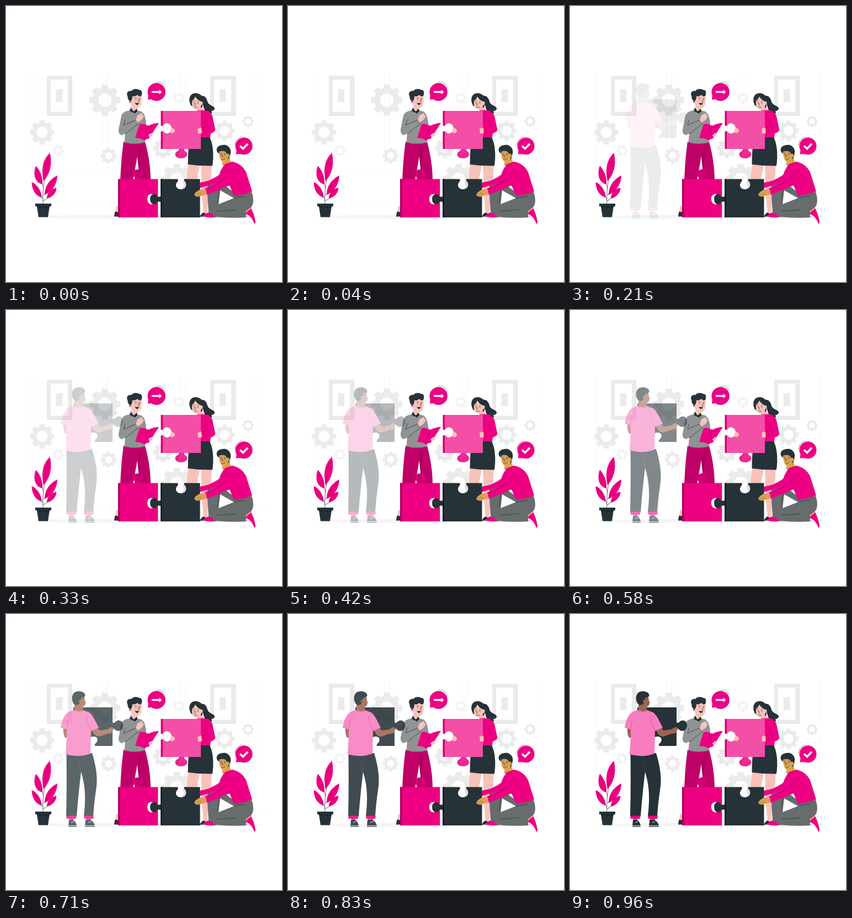
Recreate the animation shown at these times as an HTML page. Size 500 px wide and 500 px high, loop 1 s.

```html
<!DOCTYPE html>
<html lang="en">
<head>
<meta charset="utf-8">
<title>Teamwork puzzle</title>
<style>
html, body { margin: 0; width: 100%; height: 100%; overflow: hidden; background: #fff; }
svg { display: block; width: 100%; height: 100%; }
.ink { fill: #263238; }
.pink { fill: #ed0082; }
.deep { fill: #bf0069; }
.light { fill: #f34fa7; }
.gray { fill: #8f9394; }
.slate { fill: #676c6d; }
.fair { fill: #f7c2b9; }
.tan { fill: #dba050; }
.brown { fill: #9f6350; }
.white { fill: #fff; }
.line { fill: none; stroke: #263238; stroke-width: .7; stroke-linecap: round; stroke-linejoin: round; }
.fold { fill: none; stroke: #a9005c; stroke-width: .7; stroke-linecap: round; }
.mark { fill: none; stroke: #fff; stroke-width: 3.5; }
</style>
</head>
<body>
<svg viewBox="0 0 500 500">
  <defs>
    <g id="frame">
      <path fill="#ebebeb" d="M0 0H46V72H0Z"/>
      <path fill="#e2e2e2" d="M44.500 0H46V72H0V70.500H44.500Z"/>
      <path class="white" d="M7 7H38V65H7Z"/>
      <path fill="#ebebeb" d="M16.500 24.500H28.500V47.500H16.500Z"/>
    </g>
  </defs>

  <g fill="none" stroke="#f5f5f5" stroke-width=".8">
    <path d="M47 120V298H175V120M184.500 120V298H315V120M325 120V298H453V120"/>
    <path d="M32 350.500H66M85 354.500H200M440 358.500H472"/>
  </g>
  <use href="#frame" x="74" y="126.500"/>
  <use href="#frame" x="370" y="126.500"/>
  <g id="gears" fill-rule="evenodd"></g>
  <ellipse cx="258" cy="382" rx="208" ry="4" fill="#f5f5f5"/>

  <g id="plant">
    <path class="line" d="M67 358C66 340 68 328 70 312M67 353Q72 352 77 346M67 350Q61 345 58 338M68 342Q76 337 81 329M68 330Q66 321 61 313"/>
    <path class="pink" d="M68 317C64 299 65 280 79.500 266C84 284 81 304 68 317ZM66 323C53 321 48 305 54 289.500C62 298 67 310 66 323ZM70 342C70 326 79 314 93 307C93 321 84 337 70 342ZM65 347C53 344 47 333 46.500 319C57 323 64 335 65 347ZM74 349C74 339 81 331.500 91.500 329C91 340 84 346 74 349Z"/>
    <path class="fold" d="M68 317Q74 297 78 276M66 322Q62 307 56 297M70 341Q80 325 89 313M65 347Q58 333 50 324M74 348Q82 340 88 333"/>
    <path class="ink" d="M53 358H82V363H53ZM56 363H79L76 382.500H59Z"/>
    <path fill="#1a2328" d="M56 363H79L78.700 365H56.300Z"/>
  </g>

  <g id="reader">
    <path class="fair" d="M199 362H204V374H199Z"/>
    <path class="ink" d="M198 372L204 374V381.500H196Q196 376 198 372Z"/>
    <path class="deep" d="M213 246H252C258 268 262 292 262 316H242L238 272L230 316H207C208 292 210 266 213 246Z"/>
    <path fill="#a3005a" d="M238 272Q240 262 247 255Q242 266 243 280L242 306Z"/>
    <path class="fair" d="M227 180H238V192L232 195L226 190Z"/>
    <path class="fair" d="M226 162Q236 156 245 162C247 173 245 184 238 185C231 185.500 226 180 225.500 175Q221 175 222 169Z"/>
    <path class="ink" d="M226 173C221 170 220 167 220.500 164C217 158 221 153 227 154C231 149 238 150 241 152C246 151 248 157 245 163Q241 165 238 161Q233 165 229 163Q229 169 226 173Z"/>
    <circle class="pink" cx="224.500" cy="174" r="1.300"/>
    <path class="line" d="M233 167L236 166M241 167L243 167.500M239.500 169L241 173L239 173.500"/>
    <circle class="ink" cx="235.500" cy="169.500" r=".8"/><circle class="ink" cx="242" cy="169.500" r=".8"/>
    <path class="ink" d="M233 175Q238 177 241 175Q240 180 236 179Z"/>
    <path class="gray" d="M225 189C218 190 211 192 209 199L204 224Q203 232 210 234L216 231L214.500 247Q233 252 252 247L254 212Q252 194 245 191L237 189L231 195Z"/>
    <path class="ink" d="M226 184L231 191L237 186L238 191L233 195L224 190Z"/>
    <path class="line" d="M216 206L213 216L236 206M216 232L240 213"/>
    <path class="fair" d="M235 206L238 198L246 194Q249 194 246 197L250 199L246 206L239 211Z"/>
    <path class="pink" d="M242 214Q250 212 258 217Q268 212 277 212L259 240Q253 242 250 243Q242 239 234 239Z"/>
    <path class="fold" d="M258 217L250 243"/>
    <path class="fair" d="M258 234L263 230Q267 231 265 235L260 238Z"/>
  </g>

  <g id="holder">
    <path class="fair" d="M330 284H352L345 318H327ZM353 284H373C372 305 371 328 367 348L364 376H358L355 345Z"/>
    <path class="ink" d="M357 374L364 377L361 381L351 382Q353 377 357 374Z"/>
    <path class="ink" d="M352 163C358 161 363 165 365 173C368 182 379 180 378 187Q376 190 372 190Q375 195 369 196Q360 194 358 183Z"/>
    <path class="fair" d="M346 183H356L359 194H348Z"/>
    <path class="ink" d="M335 180C329 169 333 158 343 158C353 158 360 166 357 177L355 184L338 182Z"/>
    <path class="fair" d="M337 172Q341 169 343 164Q347 171 354 173Q357 173 356.500 177Q355 180 353.500 180Q352 188 346 188C339 187 336 181 337 172Z"/>
    <path class="line" d="M339 173L342 172M346 173L349 174M343 176L341.500 179.500H343M341 183.500Q344 182 347 183.500"/>
    <circle class="ink" cx="341" cy="176" r=".8"/><circle class="ink" cx="347.500" cy="176.500" r=".8"/>
    <path class="pink" d="M347 189H359C368 189 374 195 375 204L379 224Q379 228 371 231L370 239H335L348 216Z"/>
    <path class="ink" d="M334 238H369C375 249 377 269 374 289.500Q351 290 329.500 287C330 269 330 252 334 238Z"/>
    <path class="light" d="M281 190H353V259H281V228Q283 225 287 229C292 234 300 229 300 222C300 214 292 210 287 214Q283 219 281 216Z"/>
    <path fill="#d7006f" d="M280.500 190H284V217Q282 218 280.500 216ZM280.500 228Q282 226 284 227V259H280.500Z"/>
    <path fill="#ee2c97" d="M313 259H323Q322 262 326 264C332 269 326 276 318 276C309 276 303 270 309 264Q314 262 313 259Z"/>
    <path class="deep" opacity=".2" d="M313 259Q314 262 309 264C303 270 309 276 315 276Q309 269 315 264Z"/>
    <path class="fair" d="M297 224L301 221Q306 222 306 226Q305 231 299 230ZM347 223L353 220L357 224L354 231L348 231Z"/>
    <path class="pink" d="M363 205L366 217L354 222L355 231Q369 230 377 227Q380 225 378 219L374 203Z"/>
    <path class="fold" d="M364 204L366 217L355 222"/>
  </g>

  <g id="blocks">
    <path fill="#cf0073" d="M233 315Q234 310 231 308C226 301 232 296 240 296C248 296 253 302 248 308Q245 310 246 315Z"/>
    <path class="pink" d="M203 313.500H275.300V383H203Z"/>
    <path fill="#ae005f" d="M203 313.500H206.500V383H203Z"/>
    <path class="white" d="M276 343Q272 346 268 342C260 338 255 344 256 351C257 359 264 362 270 357Q274 354 276 357Z"/>
    <path class="ink" d="M280 313.500H351.500V383H280V355Q276 353 273 357C268 362 261 358 261 350C261 342 268 338 273 343Q276 347 280 345Z"/>
    <path fill="#172126" d="M280 313.500H283V383H280Z"/>
    <path class="white" d="M311 313H323Q321 316 325 319C329 327 323 332 317 332C310 332 305 326 310 319Q313 316 311 313Z"/>
    <path fill="#dedede" d="M323 314Q321 316 325 319C329 327 323 332 317 332Q325 326 320 319Z"/>
  </g>

  <g id="kneeler">
    <path class="pink" d="M366 374L383 376V382Q370 385 356 381Q360 377 366 374Z"/>
    <path class="slate" d="M365 322Q374 314 385 317L415 339L445 337C450 351 449 365 438 369L435 383Q408 385 379 382Q368 377 380 361L413 348L388 334L383 377L367 374C366 353 364 338 365 322Z"/>
    <path class="line" d="M383 371Q401 372 418 369M413 348Q423 345 433 345M386 329L383 358"/>
    <path class="tan" d="M434 371L440 368L442 374L436 377Z"/>
    <path class="pink" d="M435 375L444 366Q450 378 452 391Q452 395 449 394Q442 382 434 380Z"/>
    <path class="white" d="M434 380Q443 382 448 395L450 395Q446 382 436 377Z"/>
    <path class="tan" d="M395 276L405 275L409 287L397 292L391 287Z"/>
    <path class="ink" d="M384 266C379 261 382 253 391 252C401 249 409 258 407 267L404 277L394 272Z"/>
    <path class="tan" d="M386 264Q392 261 398 264Q400 268 402 268Q405 267 405 271Q404 275 402 275Q403 281 397 283C390 284 386 276 386 264Z"/>
    <path class="line" d="M388 267L390 266M395 267L398 267M392 269L391 273H393M391 278Q395 279 397 276"/>
    <circle class="ink" cx="389.500" cy="269.500" r=".8"/><circle class="ink" cx="396.500" cy="269.500" r=".8"/>
    <path class="pink" d="M397 286L410 282C421 284 430 291 435 301L446 336Q432 342 413 344L405 325L364 342L360 331L383 320L351 330V320Q369 318 386 306Q390 294 397 286Z"/>
    <path class="fold" d="M404 309L384 322L361 331M405 325L414 317M397 287L403 288L410 282"/>
    <path class="tan" d="M362 332L353 332Q343 336 341 342Q344 347 351 345L363 341Z"/>
    <path class="line" stroke-opacity=".4" d="M344 342L351 338M347 344L354 340"/>
  </g>

  <g id="bubbles">
    <circle class="pink" cx="272.700" cy="155.700" r="16.200"/>
    <path class="pink" d="M258 160L257 169.500L267 169Z"/>
    <path class="mark" d="M264 155.700H279"/>
    <path class="white" d="M277.500 151.500L282.500 155.700L277.500 160Z"/>
    <path class="line" stroke-opacity=".7" d="M273 137.500Q284 137 287.500 145"/>
    <circle class="pink" cx="431" cy="253.700" r="15.500"/>
    <path class="pink" d="M418 259L416.500 268.500L427 268Z"/>
    <path class="mark" d="M424 253.500L429.500 258.500L438 249.500"/>
    <path class="line" stroke-opacity=".7" d="M414 252Q415 241 426 237"/>
  </g>

  <g id="newcomer" opacity="0">
    <path class="ink" d="M122 169.500H193V196Q196 199 199 194.500C206 190 212 195 212 202C212 211 203 215 197 209Q195 206 193 209V239H161Q160 235 164 233C168 227 165 222 159 222C150 222 147 229 152 234Q154 237 153 239H122Z"/>
    <path fill="#172126" d="M122 169.500H193V171H122Z"/>
    <path class="brown" d="M104 204H113V224H107Q103 218 104 204Z"/>
    <path class="brown" d="M152 204L160 201L170 211L184 209L190 205Q195 205 195 209L191 216L184 217L169 222Q164 222 160 218Z"/>
    <path class="brown" d="M124 160H139V176Q131 180 124 174Z"/>
    <path class="brown" d="M130 151L142 150L143 157L145 161L143 163Q143 168 138 168L128 165Z"/>
    <path class="ink" d="M123 163C118 157 119 147 123 143C129 138 140 140 143 145Q145 150 139 151Q135 152 135 157Q133 165 127 165Z"/>
    <circle class="brown" cx="134" cy="158" r="2.200"/>
    <path class="line" d="M140 154L142 153.500M141 164H143"/>
    <path class="ink" d="M109.500 253L156 252C163 274 166 296 164 312C161 333 159 349 158 367L141 366C144 340 145 314 136 286C133 310 130 341 128 367L109 366C110 329 110 289 109.500 253Z"/>
    <path fill="none" stroke="#4b575d" stroke-width=".7" d="M136 286Q135 273 131 267"/>
    <path fill="#f77dbf" d="M116 176Q124 173 128 175Q134 178 139 174L150 178C157 182 162 194 168 206L154 212L153 253Q131 261 108 254L110 222V209L99 206C101 193 106 180 116 176Z"/>
    <path fill="none" stroke="#c94f92" stroke-width=".7" d="M113 190L110 210M146 184Q147 199 154 211M123 175Q131 179 140 175"/>
    <path class="brown" d="M115 370H122V376H115ZM145 370H154V376H145Z"/>
    <path class="pink" d="M109 365.500H127.500L126.500 371H110ZM141 365.500H159L158 371H142Z"/>
    <path class="ink" d="M114 373H122Q128 378 128 385.500H113ZM144 373H153Q161 378 161 385.500H143Z"/>
    <path fill="none" stroke="#fff" stroke-width=".9" d="M113 383.500H128M143 383.500H161M118 378L123 376M149 378L154 376"/>
  </g>
</svg>
<script>
const polar = (cx, cy, r, a) =>
  (cx + r * Math.cos(a)).toFixed(2) + " " + (cy + r * Math.sin(a)).toFixed(2);

function gearPath(cx, cy, r, hole) {
  const points = [];
  for (let tooth = 0; tooth < 8; tooth++) {
    const a = tooth * Math.PI / 4;
    for (const [size, turn] of [[.8, -.26], [1, -.19], [1, .19], [.8, .26]])
      points.push(polar(cx, cy, r * size, a + turn));
  }
  return `M${points.join("L")}ZM${cx - hole} ${cy}a${hole} ${hole} 0 1 0 ${2 * hole} 0a${hole} ${hole} 0 1 0 ${-2 * hole} 0Z`;
}

// x, y, outer radius, hole radius, colour
const gears = [
  [179, 170.5, 28.5, 12, "#ebebeb"], [65.5, 229, 22.5, 10, "#ebebeb"],
  [94, 262, 10.5, 5, "#f3f3f3"], [186, 271, 14.5, 6.5, "#ebebeb"],
  [313, 167, 10.5, 5, "#f3f3f3"], [396, 226, 18.5, 9, "#ebebeb"],
  [438.5, 209, 10.5, 5, "#ebebeb"], [284, 258, 18, 8, "#ebebeb"],
  [309, 314, 28.5, 12, "#ebebeb"]
];
for (const [x, y, r, hole, fill] of gears) {
  const path = document.createElementNS("http://www.w3.org/2000/svg", "path");
  path.setAttribute("d", gearPath(x, y, r, hole));
  path.setAttribute("fill", fill);
  document.getElementById("gears").append(path);
}

// The newcomer fades in over 24 held steps per loop: [step, opacity]
const STEPS = 24;
const fade = [[0, 0], [4, 0], [5, .09], [10, .33], [14, .58], [17, .75], [20, .88], [23, 1], [24, 1]];

function opacityAt(step) {
  const next = fade.findIndex(([s]) => s > step);
  const [s0, v0] = fade[next - 1], [s1, v1] = fade[next];
  return v0 + (v1 - v0) * (step - s0) / (s1 - s0);
}

const keyframes = Array.from({ length: STEPS }, (_, i) => ({
  offset: Math.round(i * 100 / STEPS) / 100, opacity: opacityAt(i), easing: "step-end"
}));
keyframes.push({ offset: 1, opacity: 1 });
document.getElementById("newcomer").animate(keyframes, { duration: 1000, iterations: Infinity });
</script>
</body>
</html>
```
